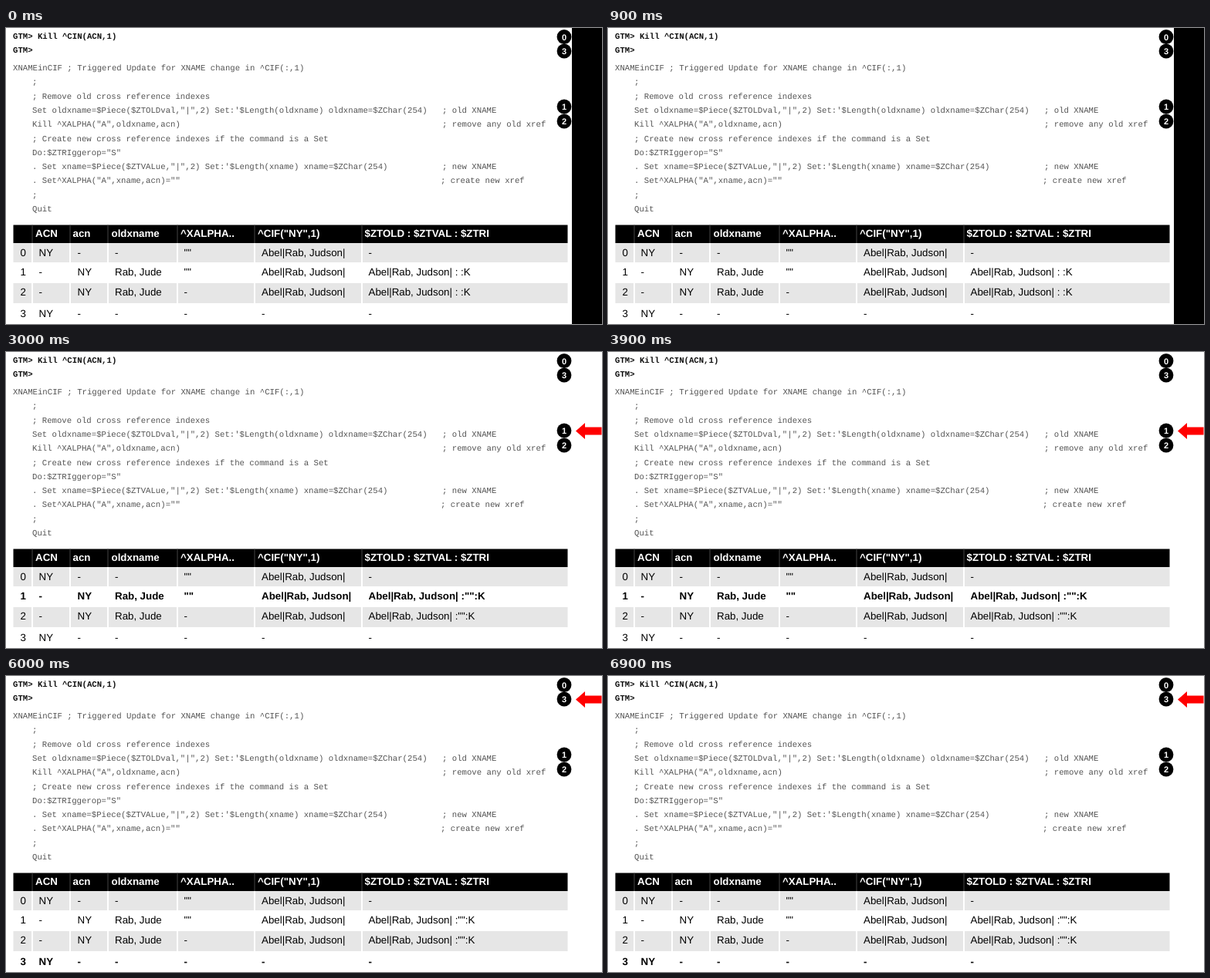
An HTML page that plays this animation: 772x384 px, repeating every 7.5 s.

```html
<!DOCTYPE html>
<html lang="en">
<head>
<meta charset="utf-8">
<title>Trigger walkthrough</title>
<style>
  html, body { margin: 0; width: 100%; height: 100%; overflow: hidden; background: #fff; }
  svg { display: block; width: 772px; height: 384px; }
  text { text-rendering: geometricPrecision; }
  .code { font: 10.667px "Liberation Mono", monospace; fill: #545454; }
  .prompt { font-weight: bold; fill: #111; }
  .cell { font: 13.333px "Liberation Sans", Arial, sans-serif; fill: #000; }
  .head { font-weight: bold; fill: #fff; }
  .active { font-weight: bold; }
  .badge { font: bold 11px "Liberation Sans", Arial, sans-serif; fill: #fff; text-anchor: middle; }
</style>
</head>
<body>
<svg id="stage" viewBox="0 0 772 384"></svg>
<script>
const STEP = 1500, STEPS = 5;
const stage = document.getElementById('stage');

function add(tag, attrs, content = '') {
  const el = document.createElementNS('http://www.w3.org/2000/svg', tag);
  for (const key in attrs) el.setAttribute(key, attrs[key]);
  el.textContent = content;
  stage.append(el);
  return el;
}
const rect = (x, y, width, height, fill) => add('rect', { x, y, width, height, fill });
const label = (x, y, cls, content) => add('text', { x, y, class: cls }, content);

// Program listing: [x, code, comment x, comment]
label(9, 14, 'code prompt', 'GTM> Kill ^CIN(ACN,1)');
label(9, 32.3, 'code prompt', 'GTM>');
[
  [9, 'XNAMEinCIF ; Triggered Update for XNAME change in ^CIF(:,1)'],
  [34, ';'],
  [34, '; Remove old cross reference indexes'],
  [34, `Set oldxname=$Piece($ZTOLDval,"|",2) Set:'$Length(oldxname) oldxname=$ZChar(254)`, 565, '; old XNAME'],
  [34, 'Kill ^XALPHA("A",oldxname,acn)', 565, '; remove any old xref'],
  [34, '; Create new cross reference indexes if the command is a Set'],
  [34, 'Do:$ZTRIggerop="S"'],
  [34, `. Set xname=$Piece($ZTVALue,"|",2) Set:'$Length(xname) xname=$ZChar(254)`, 565, '; new XNAME'],
  [34, '. Set^XALPHA("A",xname,acn)=""', 563, '; create new xref'],
  [34, ';'],
  [34, 'Quit']
].forEach(([x, code, noteX, note], i) => {
  const y = 55 + 18.3 * i;
  label(x, y, 'code', code);
  if (note) label(noteX, y, 'code', note);
});

// Table
const dividers = [33, 82, 131, 221, 321, 460];
const left = 9.5, width = 718;
rect(left, 255.5, width, 23.5, '#000');
rect(left, 279, width, 25, '#e6e6e6');
rect(left, 331, width, 26, '#e6e6e6');
for (const x of dividers) {
  rect(x + 0.5, 255.5, 1, 23.5, '#444');
  rect(x, 279, 2, 78, '#fff');
}

const headX = [38, 86.5, 136.5, 226, 326, 464.5];
['ACN', 'acn', 'oldxname', '^XALPHA..', '^CIF("NY",1)', '$ZTOLD : $ZTVAL : $ZTRI']
  .forEach((name, i) => label(headX[i], 271, 'cell head', name));

const record = 'Abel|Rab, Judson|', oldName = 'Rab, Jude';
const cellX = [18.5, 42.5, 92.5, 141, 230.5, 331, 469.5];
const rowY = [296, 321, 347, 375];
const rows = [
  ['0', 'NY', '-', '-', '""', record, '-'],
  ['1', '-', 'NY', oldName, '""', record, ''],
  ['2', '-', 'NY', oldName, '-', record, ''],
  ['3', 'NY', '-', '-', '-', '-', '-']
].map((row, r) => row.map((value, c) => label(cellX[c], rowY[r], 'cell', value)));
const suffixes = [' : :K', ' :"" :K', ' :"":K'];

// Badges mark where each table row belongs in the listing
const badgeY = [11.5, 102, 121, 30];
badgeY.forEach((y, i) => {
  add('circle', { cx: 723, cy: y, r: 9.4, fill: '#000' });
  label(723, y + 4, 'badge', i);
});

const panel = rect(733, 0, 39, 384, '#000');
const arrow = add('path', { d: 'M738 0L750 -10.5V-5H771.5V5H750V10.5Z', fill: '#f00' });

let shown = -1;
function show(step) {
  if (step === shown) return;
  shown = step;
  const active = step - 1;
  panel.style.display = step ? 'none' : '';
  arrow.style.display = step ? '' : 'none';
  if (step) arrow.setAttribute('transform', `translate(0 ${badgeY[active] + 0.5})`);
  rows.forEach((row, r) => row.forEach(cell => cell.classList.toggle('active', r === active)));
  for (const r of [1, 2]) rows[r][6].textContent = record + suffixes[Math.min(step, 2)];
}

function tick() {
  show(Math.floor(performance.now() / STEP) % STEPS);
  requestAnimationFrame(tick);
}
tick();
</script>
</body>
</html>
```
